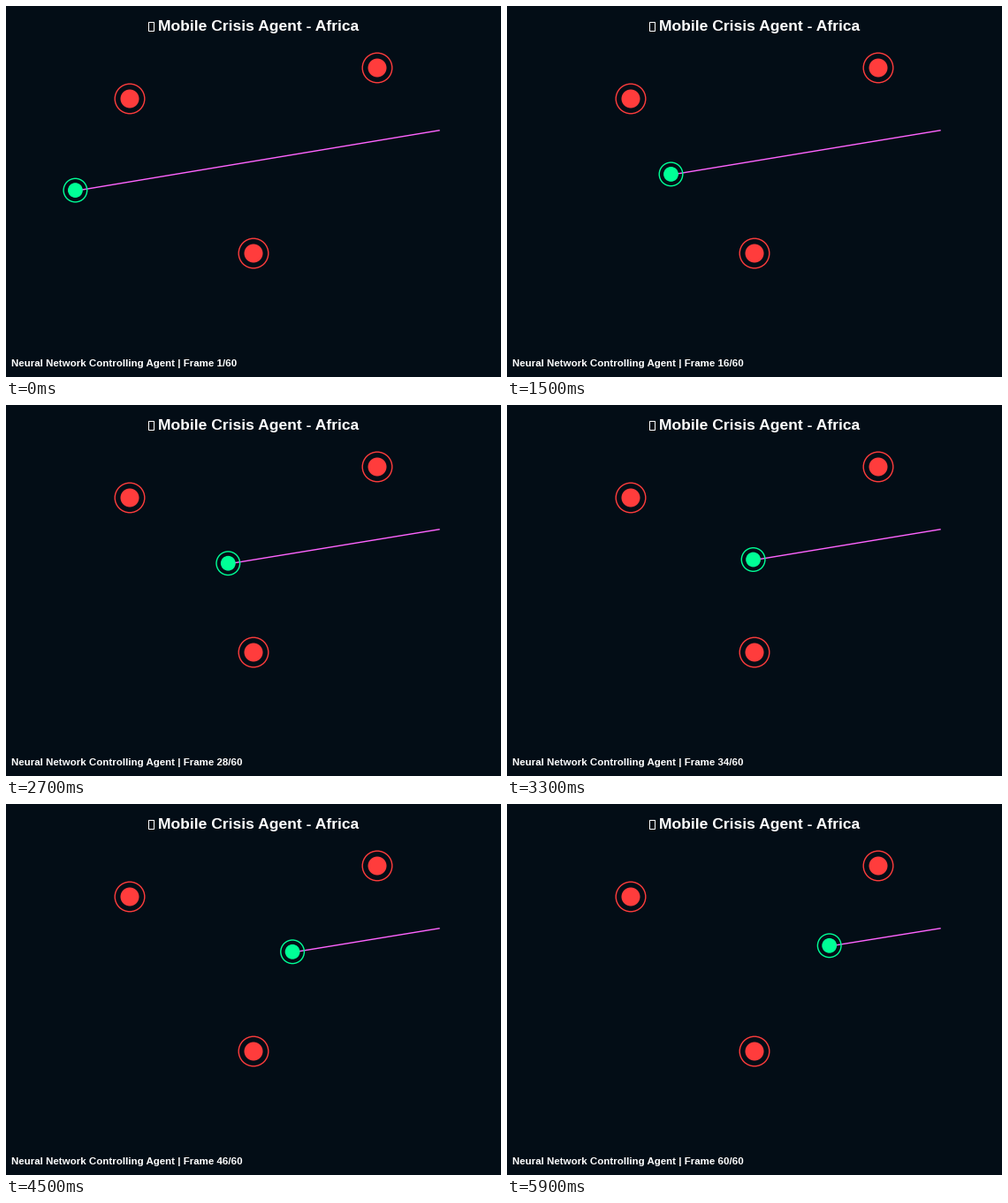
Write a matplotlib script that moves like this. It is 560x420 px and loops after 6000 ms.

```python
import matplotlib.pyplot as plt
from matplotlib.animation import FuncAnimation
from matplotlib.patches import Circle, Rectangle

W, H, DPI = 560, 420, 100
FRAMES, INTERVAL = 60, 100
PT = 72 / DPI  # points per pixel
S = 0.7        # stage pixels per world unit

BG = "#030d16"
RED = "#ff3c3c"
GREEN = "#00ff96"
VIOLET = "#ff64ff"

START, GOAL = (100, 300), (700, 200)
CRISES = [(200, 150), (600, 100), (400, 400)]
EASE = 0.02

plt.rcParams["font.family"] = "Liberation Sans"
fig = plt.figure(figsize=(W / DPI, H / DPI), dpi=DPI, facecolor=BG)
ax = fig.add_axes([0, 0, 1, 1])
ax.set_xlim(0, W)
ax.set_ylim(H, 0)
ax.axis("off")


def label(x, y, text, px):
    return ax.text(x, y, text, color="white", weight="bold",
                   fontsize=px * PT, va="baseline")


def marker(pos, r_dot, r_ring, color):
    """Filled dot inside a two-unit ring."""
    center = (pos[0] * S, pos[1] * S)
    dot = Circle(center, r_dot * S, fc=color, ec="none", zorder=3)
    ring = Circle(center, (r_ring - 1) * S, fc="none", ec=color,
                  lw=2 * S * PT, zorder=3)
    ax.add_patch(dot)
    ax.add_patch(ring)
    return dot, ring


def agent_at(i):
    """The agent covers a fixed share of the remaining way each step."""
    left = (1 - EASE) ** (i + 1)
    return [int(g + (s - g) * left + 1e-6) for s, g in zip(START, GOAL)]


ax.add_patch(Rectangle((161, 17.5), 6, 10.5, fc="none", ec="white", lw=PT))
label(171.5, 28, "Mobile Crisis Agent - Africa", 17.5)
status = label(6.5, 408.3, "", 11.45)

for spot in CRISES:
    marker(spot, 15, 25, RED)
agent = marker(START, 12, 20, GREEN)
path, = ax.plot([], [], color=VIOLET, lw=2 * S * PT, zorder=2,
                solid_capstyle="butt")


def update(i):
    x, y = agent_at(i)
    for part in agent:
        part.center = (x * S, y * S)
    path.set_data([x * S, (GOAL[0] + 1) * S], [(y + 1) * S, (GOAL[1] + 1) * S])
    status.set_text(f"Neural Network Controlling Agent | Frame {i + 1}/{FRAMES}")
    return (*agent, path, status)


anim = FuncAnimation(fig, update, frames=FRAMES, interval=INTERVAL,
                     repeat=True, repeat_delay=0)
plt.show()
```
